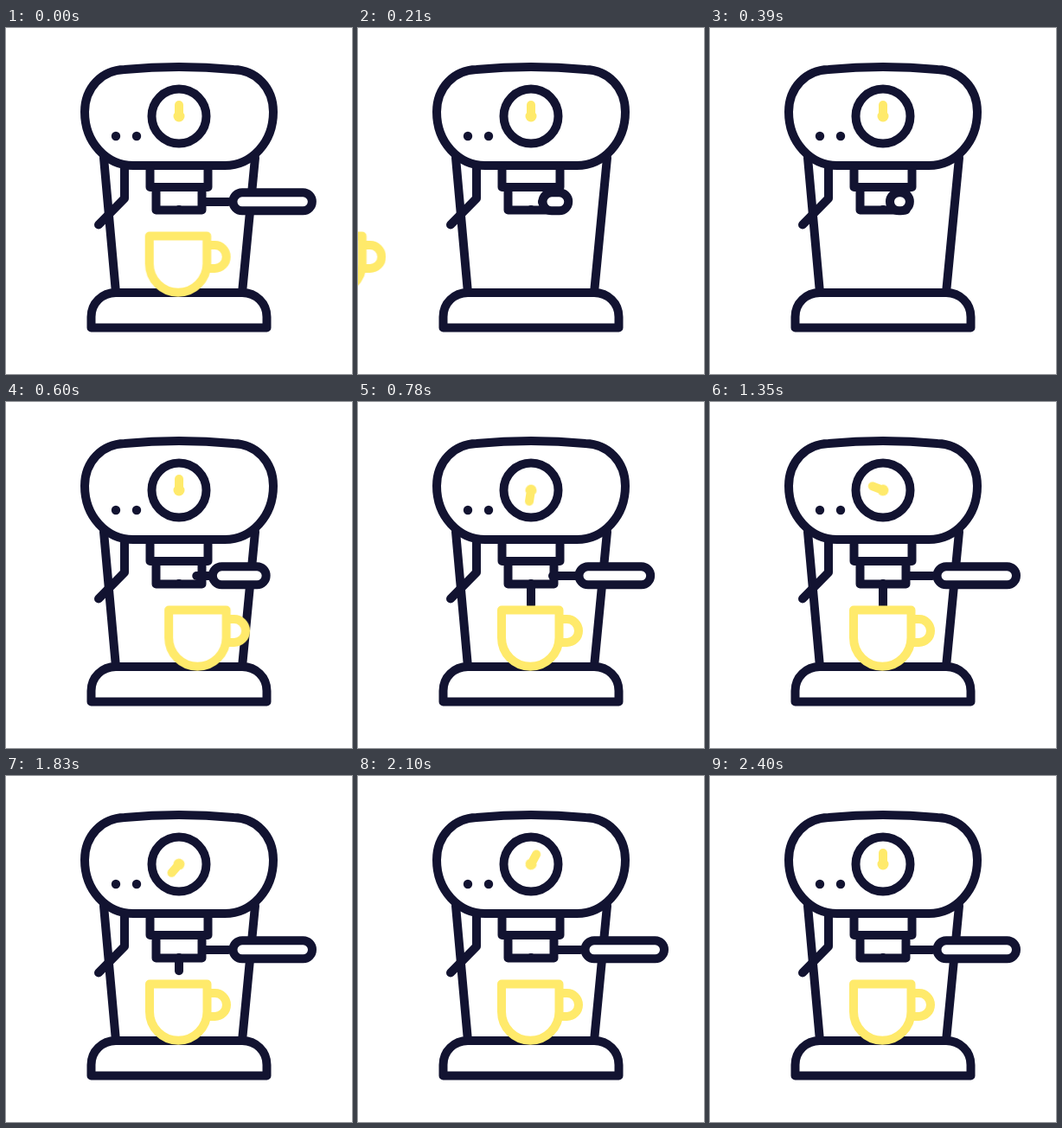
An HTML page for the animation above (2.46 s loop, 400 by 400 pixels).

```html
<!DOCTYPE html>
<html lang="en">
<head>
<meta charset="utf-8">
<title>Coffee machine</title>
<style>
  :root {
    --ink: #121331;
    --sun: #ffea6b;
    --loop: 2460ms infinite both;
    --snap: cubic-bezier(.2, 0, 0, 1);
    --soft: cubic-bezier(.33, 0, .67, 1);
  }
  html, body { margin: 0; width: 100%; height: 100%; overflow: hidden; background: #fff; }
  svg { display: block; width: 100%; height: 100%; }

  .line {
    fill: none; stroke: var(--ink); stroke-width: 10;
    stroke-linecap: round; stroke-linejoin: round;
  }
  .solid { fill: var(--ink); }
  .white { fill: #fff; }
  .sun { stroke: var(--sun); }

  .cup { animation: cup var(--loop); }
  .grip { animation: grip var(--loop); }
  .shaft { animation: shaft var(--loop); }
  .needle { animation: needle var(--loop); }
  .stream { animation: stream var(--loop); }

  /* leaves to the left, comes back from the right */
  @keyframes cup {
    0% { transform: translateX(0); animation-timing-function: var(--soft); }
    14.634% { transform: translateX(-260px); animation-timing-function: step-end; }
    14.635% { transform: translateX(260px); animation-timing-function: var(--snap); }
    29.756%, 100% { transform: translateX(0); }
  }
  /* swings to face the viewer and back */
  @keyframes grip {
    0% { x: 262.5px; width: 91.5px; animation-timing-function: var(--soft); }
    14.634% { x: 206.5px; width: 21px; animation-timing-function: var(--snap); }
    43.902%, 100% { x: 262.5px; width: 91.5px; }
  }
  @keyframes shaft {
    0% { x: 222px; width: 40px; animation-timing-function: var(--soft); }
    14.634% { x: 206px; width: 16px; animation-timing-function: var(--snap); }
    43.902%, 100% { x: 222px; width: 40px; }
  }
  @keyframes needle {
    0%, 24.39% { transform: rotate(0deg); animation-timing-function: var(--snap); }
    43.902%, 70.122% { transform: rotate(291deg); animation-timing-function: var(--snap); }
    94.512%, 100% { transform: rotate(0deg); }
  }
  @keyframes stream {
    0%, 24.39% { height: 10px; animation-timing-function: var(--snap); }
    39.024%, 70.122% { height: 40px; animation-timing-function: var(--snap); }
    85%, 100% { height: 10px; }
  }
</style>
</head>
<body>
<svg viewBox="0 0 400 400">
  <g class="line">
    <!-- frame and base -->
    <path d="M113 150L127 306M288 150L273 306"/>
    <path d="M98.5 346.5V334C98.5 318 111 306 127 306H273C289 306 301.5 318 301.5 334V346.5Z"/>
    <path d="M137 162V197L107 227.5"/>

    <!-- head -->
    <path d="M147 159H253C284 159 309 132 309 97C309 69 289 48.5 263 48Q200 42 137 48C111 48.5 91 69 91 97C91 132 116 159 147 159Z"/>
    <circle cx="200" cy="102" r="31.5"/>

    <!-- brew group -->
    <path d="M166.5 160V184H233.5V160M173.5 184V210.5H226.5V184"/>
  </g>

  <g class="solid">
    <circle cx="127" cy="125" r="5.2"/>
    <circle cx="151" cy="125" r="5.2"/>
    <rect class="stream" x="195" y="205" width="10" height="10" rx="5"/>
    <rect class="shaft" x="222" y="196" width="40" height="10" rx="5"/>
  </g>

  <rect class="line white grip" x="262.5" y="190.3" width="91.5" height="21" rx="10.5"/>

  <g transform="translate(200 102)">
    <g class="needle">
      <circle r="6.5" fill="var(--sun)"/>
      <path class="line sun" d="M0 0V-13"/>
    </g>
  </g>

  <g class="cup">
    <path class="line sun white" d="M233 251H241.5a13.5 13.5 0 0 1 0 27H233"/>
    <path class="line sun white" d="M166 240.5H232.5V272.5a33.25 33.25 0 0 1 -66.5 0Z"/>
  </g>
</svg>
</body>
</html>
```
